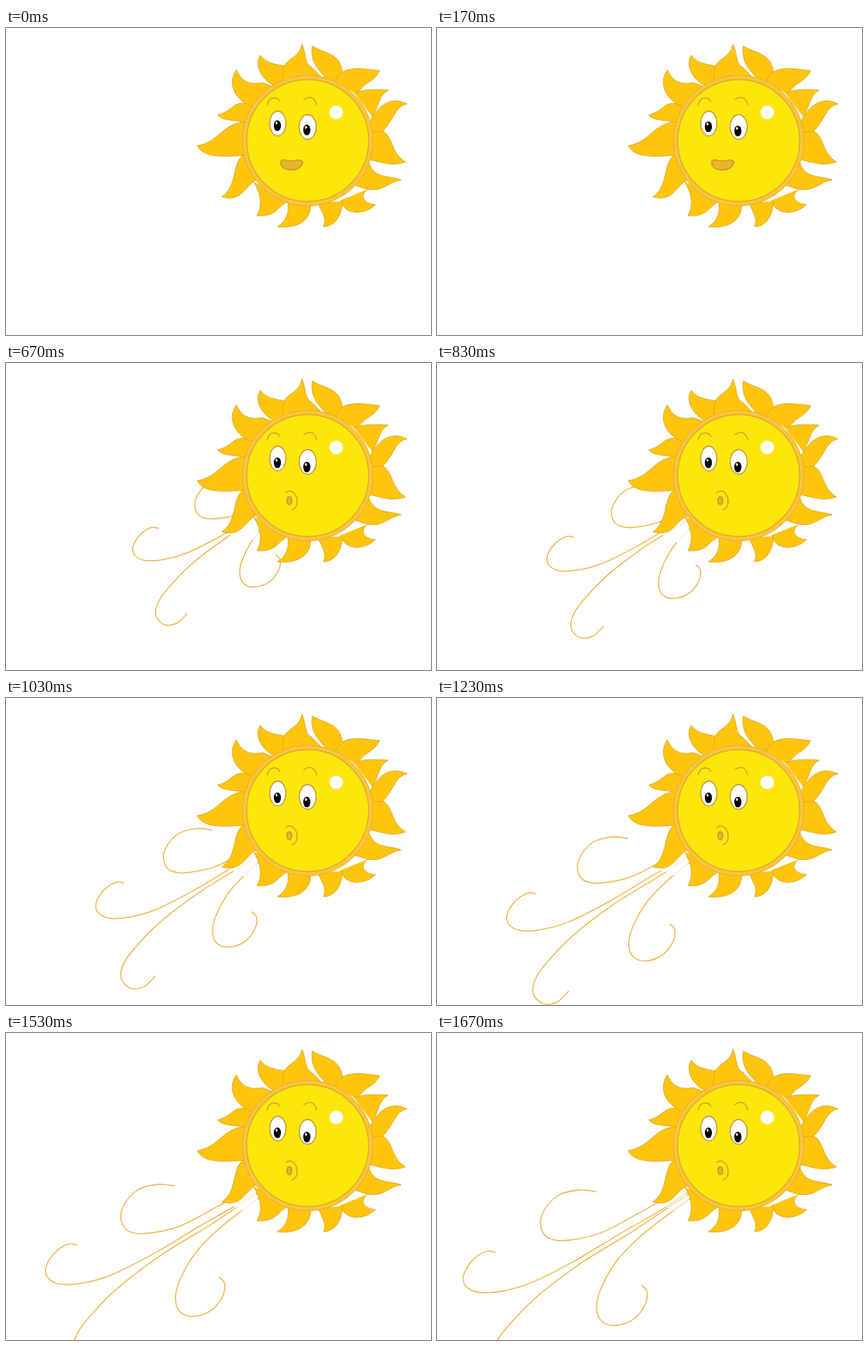
An HTML page for the animation above (2.2 s loop, 498 by 360 pixels).

```html
<!DOCTYPE html>
<html lang="en">
<head>
<meta charset="utf-8">
<title>Blowing sun</title>
<style>
html, body { margin: 0; width: 100%; height: 100%; overflow: hidden; background: #fff; }
svg { display: block; width: 498px; height: 360px; }
path { stroke-linecap: round; stroke-linejoin: round; }
#wind { fill: none; stroke: #efb64e; stroke-width: 1.3; }
#wind path { vector-effect: non-scaling-stroke; }
#rays { fill: #fec50c; stroke: #dca52c; stroke-width: .8; }
.line { fill: none; stroke: #d9a52a; stroke-width: 1.4; }
.lip { fill: #e6b62c; stroke: #c89630; stroke-width: 1.3; }
.eye { fill: #fff; stroke: #c9983a; stroke-width: 1.3; }
</style>
</head>
<body>
<svg viewBox="0 0 498 360">
  <g id="wind"></g>
  <path id="gap" d="M260 200L291 181L296 200L284 212Z" fill="#fff"/>
  <g id="rays">
    <path d="M281 110C255 110 250 134 224 138C232 153 255 151 282 149"/>
    <path d="M288 91C266 82 268 97 248 102C255 110 268 107 282 111"/>
    <path d="M288 92C270 86 258 66 270 49C276 64 288 67 300 64L316 70"/>
    <path d="M318 70C300 62 290 44 298 32C306 44 322 42 330 46L336 60"/>
    <path d="M324 60L325 47C330 34 343 36 347 19C352 32 350 42 358 46L372 60"/>
    <path d="M376 60C362 45 357 38 359 21C372 30 390 28 394 50L398 66"/>
    <path d="M386 62C394 42 418 48 438 50C430 65 420 62 411 78"/>
    <path d="M408 76C420 71 436 72 448 73C437 78 438 90 429 104"/>
    <path d="M425 112C437 88 452 80 470 89C452 92 455 118 428 130"/>
    <path d="M428 122L441 121C454 126 450 146 468 157C452 163 440 157 424 154"/>
    <path d="M424 154C430 178 446 172 463 178C446 181 442 194 420 188L408 184"/>
    <path d="M424 189C412 198 422 207 433 207C420 220 396 220 392 202"/>
    <path d="M394 203C394 222 384 233 372 233C377 222 368 214 366 205"/>
    <path d="M357 206C358 222 346 236 318 233C330 226 332 214 330 203"/>
    <path d="M332 203C318 208 318 222 294 220C300 210 300 196 290 180"/>
    <path d="M284 146C262 152 274 184 253 198C276 204 278 188 293 178"/>
  </g>
  <circle cx="353.5" cy="132" r="76.5" fill="#fbc53a" stroke="#e6b03c" stroke-width="1"/>
  <circle cx="353.5" cy="132" r="71.5" fill="#fbe70c" stroke="#dfac32" stroke-width="1.3"/>
  <circle cx="387" cy="99" r="8" fill="#fff" stroke="#f6e8a0" stroke-width=".8"/>
  <path class="line" d="M306 90Q308 82 314 82Q319 82 321 86M349 84Q354 80 359 82Q363 85 364 90"/>
  <ellipse class="eye" cx="318.5" cy="112" rx="9.5" ry="14.5"/>
  <ellipse class="eye" cx="353.5" cy="116" rx="10" ry="14.5"/>
  <g id="pupils">
    <ellipse cx="318" cy="114.5" rx="4.2" ry="6.3"/>
    <ellipse cx="352.5" cy="119.5" rx="4.2" ry="6.3"/>
    <ellipse cx="317" cy="111.5" rx="1.2" ry="1.7" fill="#fff"/>
    <ellipse cx="351.5" cy="116.5" rx="1.2" ry="1.7" fill="#fff"/>
  </g>
  <path id="smile" class="lip" d="M322 156Q324 154 328 155Q335 157 341 155Q347 154 348 158Q345 166.500 334 166.500Q321 166 322 156Z"/>
  <g id="blow">
    <path class="line" d="M328 152Q332 148 337 152Q342 157 341 165Q340 171 335 172"/>
    <ellipse class="lip" cx="332" cy="161.500" rx="2.800" ry="4.500"/>
  </g>
</svg>
<script>
const LOOP = 2200, FPS = 30;
const LOOK_END = 10, BLOW = 19, BLOW_END = 50;
const PIVOT = [625, -62], GROW = 0.00661;
const $ = id => document.getElementById(id);

// Gusts at full size, from the curled tip back to the mouth
const gusts = [
  [[186,186], [166,184], [141,191], [124,211], [122,229], [132,241], [154,243], [193,234], [235,212], [262,197], [300,175]],
  [[68,257], [58,256], [42,266], [31,284], [34,297], [48,304], [75,303], [110,293], [160,268], [215,235], [262,208], [310,176]],
  [[110,382], [95,396], [77,398], [65,386], [66,370], [78,350], [115,311], [170,269], [227,234], [272,204], [315,176]],
  [[240,296], [246,303], [244,318], [231,335], [210,343], [193,338], [187,322], [192,300], [210,268], [240,237], [272,212], [310,184]]
];

// Smooth curve through the points
function smooth(pts) {
  const at = i => pts[Math.max(0, Math.min(pts.length - 1, i))];
  let d = "M" + pts[0];
  for (let i = 0; i < pts.length - 1; i++) {
    const a = at(i - 1), b = at(i), c = at(i + 1), e = at(i + 2);
    const h1 = b.map((v, j) => v + (c[j] - a[j]) / 6);
    const h2 = c.map((v, j) => v - (e[j] - b[j]) / 6);
    d += "C" + [h1, h2, c].join(" ");
  }
  return d;
}

for (const pts of gusts) {
  const path = document.createElementNS("http://www.w3.org/2000/svg", "path");
  path.setAttribute("d", smooth(pts));
  $("wind").append(path);
}

const show = (id, on) => $(id).setAttribute("display", on ? "inline" : "none");

function draw(ms) {
  const step = Math.floor((ms % LOOP + 3.4) * FPS / 1000);
  const blowing = step >= BLOW;

  const look = Math.min(step / LOOK_END, 1);
  $("pupils").setAttribute("transform", `translate(0 ${2.5 * look})`);

  show("smile", !blowing);
  show("blow", blowing);
  show("wind", blowing);

  const s = 1 - Math.max(0, BLOW_END - step) * GROW;
  const [x, y] = PIVOT;
  $("wind").setAttribute("transform", `translate(${x} ${y}) scale(${s}) translate(${-x} ${-y})`);
  $("gap").setAttribute("opacity", step < BLOW_END ? 0.8 : 0.5);
}

const start = performance.now();
function tick() {
  draw(performance.now() - start);
  requestAnimationFrame(tick);
}
tick();
</script>
</body>
</html>
```
